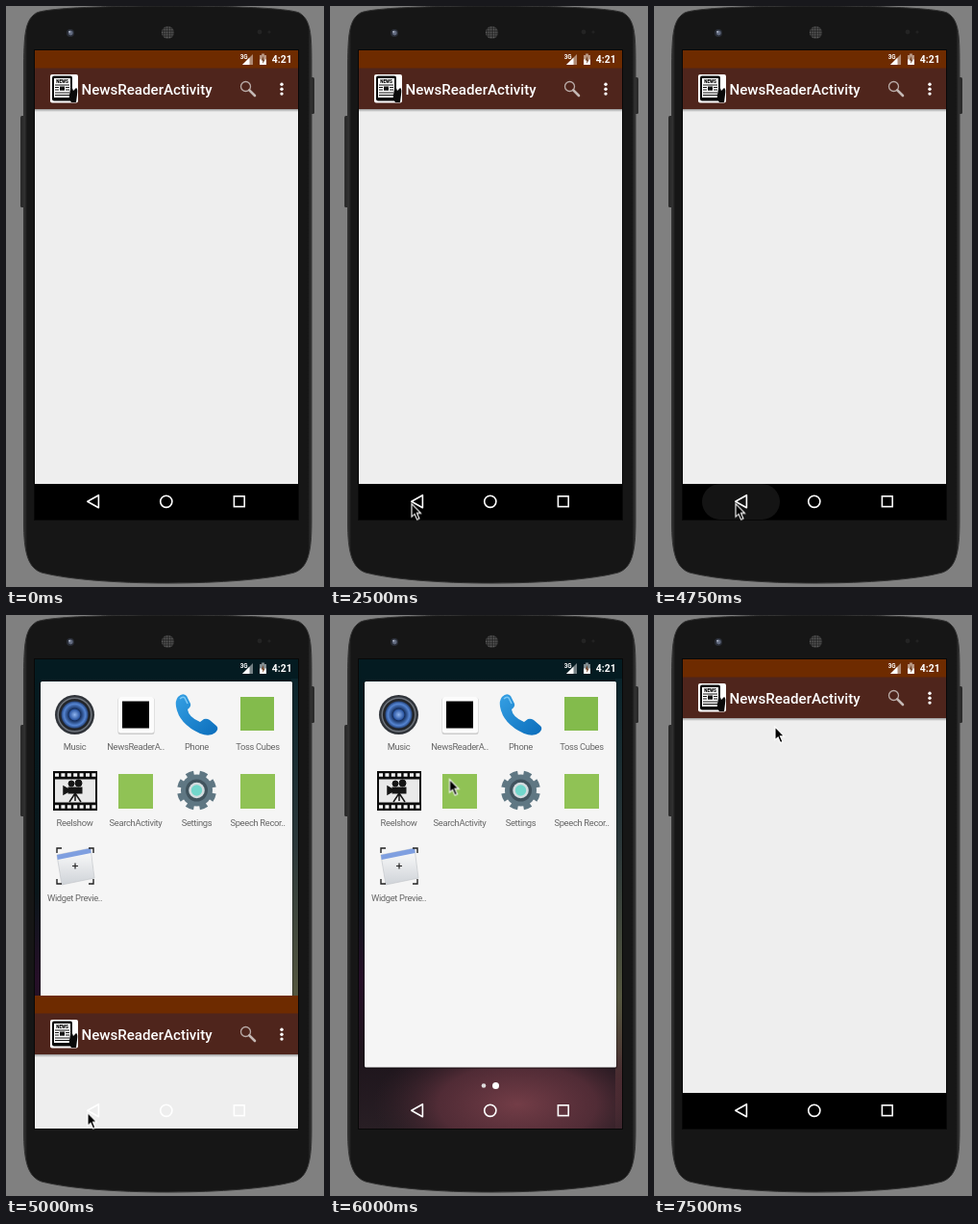
An HTML page that plays this animation: 331x603 px, repeating every 8000 ms.

```html
<!DOCTYPE html>
<html lang="en">
<head>
<meta charset="utf-8">
<title>Phone app launcher</title>
<style>
  html, body { margin: 0; width: 100%; height: 100%; overflow: hidden; background: #808080; }
  svg { display: block; width: 331px; height: 603px; }
  text { font-family: Roboto, "Open Sans", sans-serif; }
  .label { font-size: 9.4px; letter-spacing: -.33px; fill: #666; text-anchor: middle; }
  .line { fill: none; stroke: #fff; stroke-width: 1.6; }
</style>
</head>
<body>
<svg viewBox="0 0 331 603">
  <defs>
    <clipPath id="screen"><rect x="30" y="46" width="274" height="487"/></clipPath>
    <linearGradient id="rim">
      <stop offset="0" stop-color="#3a3a3a"/><stop offset=".012" stop-color="#161616"/>
      <stop offset=".988" stop-color="#161616"/><stop offset="1" stop-color="#3a3a3a"/>
    </linearGradient>
    <linearGradient id="wall" x2="0" y2="1">
      <stop offset="0" stop-color="#041b21"/><stop offset=".5" stop-color="#0a161a"/>
      <stop offset=".68" stop-color="#260f28"/><stop offset=".85" stop-color="#1e151c"/>
      <stop offset="1" stop-color="#281e24"/>
    </linearGradient>
    <linearGradient id="side" x2="0" y2="1">
      <stop offset="0" stop-color="#06222a"/><stop offset=".4" stop-color="#2c383a"/>
      <stop offset=".72" stop-color="#55573f"/><stop offset=".9" stop-color="#4a2c30"/>
      <stop offset="1" stop-color="#33242a"/>
    </linearGradient>
    <radialGradient id="glow">
      <stop offset="0" stop-color="#733d47"/><stop offset=".55" stop-color="#5c303b" stop-opacity=".8"/>
      <stop offset="1" stop-color="#3a222b" stop-opacity="0"/>
    </radialGradient>
    <linearGradient id="drop" x2="0" y2="1">
      <stop offset="0" stop-color="#999"/><stop offset="1" stop-color="#eee"/>
    </linearGradient>
    <radialGradient id="cone">
      <stop offset="0" stop-color="#8fb4ee"/><stop offset=".38" stop-color="#2f5aa6"/>
      <stop offset=".45" stop-color="#16305f"/><stop offset=".8" stop-color="#5585d2"/>
      <stop offset="1" stop-color="#25447c"/>
    </radialGradient>
    <linearGradient id="blue" x2="1" y2="1">
      <stop offset="0" stop-color="#35a0e4"/><stop offset="1" stop-color="#0b6dbb"/>
    </linearGradient>
    <linearGradient id="pane" x2="0" y2="1">
      <stop offset="0" stop-color="#fdfdfd"/><stop offset="1" stop-color="#cfd3d8"/>
    </linearGradient>
    <pattern id="mesh" width="2.6" height="2.6" patternUnits="userSpaceOnUse">
      <circle cx="1.3" cy="1.3" r=".8" fill="#6a6a6a"/>
    </pattern>
  </defs>

  <!-- phone -->
  <rect width="331" height="603" fill="#808080"/>
  <rect x="15" y="114" width="5" height="95" rx="1.5" fill="#2b2b2b"/>
  <rect x="316" y="74" width="5" height="38" rx="1.5" fill="#2b2b2b"/>
  <path d="M18.5 60C19 28 20 14 32 7 44 2 100 0 168 0S292 2 305 7C317 14 318 28 318 60V535C318 568 314 583 300 588 274 595 222 599 168 599S64 595 37 588C23 583 18.5 568 18.5 535Z" fill="url(#rim)" stroke="#303030"/>
  <circle cx="67" cy="28" r="4" fill="#292d36"/>
  <circle cx="67.3" cy="28" r="2.4" fill="#626b80"/>
  <circle cx="66.2" cy="26.8" r="1" fill="#b0b7c6"/>
  <circle cx="168.5" cy="27.5" r="6.7" fill="#262626"/>
  <circle cx="168.5" cy="27.5" r="6.5" fill="url(#mesh)"/>
  <circle cx="264" cy="27" r="2.4" fill="#242424"/>
  <circle cx="274" cy="27" r="1.6" fill="#222"/>
  <rect x="29" y="45" width="276" height="489" fill="#080808"/>

  <g clip-path="url(#screen)">
    <!-- launcher -->
    <rect x="30" y="46" width="274" height="487" fill="url(#wall)"/>
    <rect x="297" y="46" width="7" height="487" fill="url(#side)"/>
    <rect x="30" y="46" width="274" height="20" fill="#041b21"/>
    <ellipse cx="195" cy="508" rx="150" ry="75" fill="url(#glow)"/>
    <rect x="35" y="69" width="264" height="402" rx="2" fill="#000" opacity=".35"/>
    <rect x="36" y="69" width="262" height="400.5" rx="1.5" fill="#f5f5f5"/>
    <circle cx="160" cy="488.5" r="2.3" fill="#ddd"/>
    <circle cx="172.5" cy="488.5" r="3.5" fill="#fff"/>

    <!-- speaker -->
    <circle cx="71.5" cy="103.5" r="20.5" fill="#30343a"/>
    <circle cx="71.5" cy="103.5" r="17.3" fill="#22252a" stroke="#6e747c" stroke-width="1.5"/>
    <circle cx="71.5" cy="103.5" r="14" fill="url(#cone)"/>

    <!-- reader tile -->
    <rect x="116.5" y="85.5" width="38" height="38.5" rx="2.5" fill="#ccc"/>
    <rect x="117" y="85" width="37" height="37.5" rx="2.5" fill="#fcfcfc"/>
    <rect id="tile" x="121" y="89.5" width="28" height="28" fill="#000"/>

    <!-- handset -->
    <path d="M179 85Q184 80 188 84L192 92Q193 95 189 98 190 106 202 111L206 108Q209 107 212 109L219 115Q222 118 218 122 212 127 202 123 180 113 177 95 176 89 179 85Z" fill="url(#blue)"/>
    <path d="M181 87Q184 84 186 86L189 92" fill="none" stroke="#7cc8f4" stroke-width="1.5"/>

    <rect x="244" y="85" width="35" height="35" fill="#83bb4c"/>
    <rect x="117" y="165" width="36" height="36" fill="#90c255"/>
    <rect x="244" y="165" width="36" height="36" fill="#90c255"/>

    <!-- film -->
    <rect x="49" y="162" width="46" height="41" fill="#0b0b0b"/>
    <path d="M51 166H94M51 199H94" stroke="#f5f5f5" stroke-width="3.6" stroke-dasharray="4 2.4"/>
    <rect x="51" y="170.5" width="42" height="24" fill="#e9e9e9"/>
    <g fill="#151515" stroke="#151515">
      <circle cx="68" cy="175" r="3"/><circle cx="75.5" cy="174.5" r="3.5"/>
      <rect x="65" y="179" width="14" height="6"/>
      <path d="M65 181L60 178V186L65 183M72 185L66 194M72 185L78 194M72 185V193" stroke-width="1.5"/>
    </g>

    <!-- gear -->
    <circle cx="198.5" cy="182" r="16.5" fill="#5f7783"/>
    <circle cx="198.5" cy="182" r="17.5" fill="none" stroke="#5f7783" stroke-width="6" pathLength="80" stroke-dasharray="5.6 4.4" stroke-dashoffset="-2.2"/>
    <circle cx="198.5" cy="182" r="11.5" fill="#41545e"/>
    <circle cx="198.5" cy="182" r="8.3" fill="#d3dcdf"/>
    <circle cx="198.5" cy="182" r="5.7" fill="#72d7cc"/>

    <!-- widget -->
    <path d="M53 249L88 242 92 273 58 280Z" fill="url(#pane)" stroke="#c4c8cc" stroke-width=".7"/>
    <path d="M53 249L88 242 88.6 247 53.7 254Z" fill="#7f9fe0"/>
    <path d="M53 247V242H58M86 242H91V247M91 274V279H86M58 279H53V274" fill="none" stroke="#222" stroke-width="1.4"/>
    <path d="M69 260.5H75M72 257.5V263.5" stroke="#222" stroke-width="1.2"/>

    <g id="labels"></g>

    <!-- reader screen -->
    <g id="app">
      <rect x="30" y="46" width="274" height="19" fill="#6e2b00"/>
      <rect x="30" y="64.5" width="274" height="43" fill="#4f251c"/>
      <rect x="30" y="107" width="274" height="430" fill="#eee"/>
      <rect x="30" y="107" width="274" height="3" fill="url(#drop)"/>
      <rect x="46" y="71" width="29" height="29.5" rx="2" fill="#fff"/>
      <rect x="48" y="72.5" width="21" height="26" rx="2" fill="#0a0a0a"/>
      <rect x="50" y="75" width="17" height="20" fill="#fff"/>
      <text x="58.5" y="79.8" font-size="4.6" font-weight="900" text-anchor="middle">NEWS</text>
      <path d="M51 82H66M51 84.5H55M62 84.5H66M51 87H55M62 87H66M51 90H66M51 92.5H66" stroke="#111" stroke-width="1.1"/>
      <rect x="56" y="83.5" width="5" height="4.2" fill="#111"/>
      <path d="M67 86Q69 83 70 88L73 85Q75 86 74 92L73 100H68Q65 96 66 92Z" fill="#0a0a0a"/>
      <text x="78.5" y="92" font-size="15.1" font-weight="500" fill="#fff">NewsReaderActivity</text>
      <circle cx="249.5" cy="83.5" r="5" fill="none" stroke="#b9aba7" stroke-width="1.3"/>
      <path d="M253.3 87.3L259 93" stroke="#c4b8b4" stroke-width="2.6" stroke-linecap="round"/>
      <g fill="#fff"><circle cx="287" cy="81.3" r="1.7"/><circle cx="287" cy="86.2" r="1.7"/><circle cx="287" cy="91.1" r="1.7"/></g>
    </g>

    <!-- status -->
    <g fill="#fff">
      <text x="243.7" y="54.5" font-size="6.3" font-weight="700">3G</text>
      <path d="M246 61L257 50V61Z" opacity=".45"/>
      <path d="M246 61L253.5 53.5V61Z"/>
      <path d="M264 51H266V49.5H269V51H271V61H264Z" opacity=".5"/>
      <path d="M264 55.5H271V61H264Z"/>
      <path d="M268 52L265.8 56.5H267.3V60L269.5 55.5H268Z" fill="#6b3a1c"/>
      <text x="276.8" y="59.2" font-size="10.4" font-weight="700">4:21</text>
    </g>

    <!-- navigation -->
    <rect id="bar" x="30" y="496" width="274" height="37" fill="#000"/>
    <rect id="ripple" x="50" y="496" width="81" height="37" rx="18.5" fill="#323232"/>
    <path class="line" d="M84.8 514.2L96.4 507.7V520.7Z" stroke-linejoin="round"/>
    <circle class="line" cx="166.8" cy="514.3" r="6.1"/>
    <rect class="line" x="237.4" y="508.8" width="10.8" height="10.8"/>
  </g>

  <path id="cursor" d="M0 0V13.6L3.1 10.8 5.6 16.6 8 15.5 5.5 9.9H9.6Z" fill="#000" stroke="#fff" stroke-width="1.1"/>
</svg>
<script>
  const LOOP = 8000;
  const $ = id => document.getElementById(id);

  const names = ['Music', 'NewsReaderA..', 'Phone', 'Toss Cubes', 'Reelshow',
    'SearchActivity', 'Settings', 'Speech Recor..', 'Widget Previe..'];
  const columns = [71.5, 135, 198.5, 262];
  $('labels').innerHTML = names.map((name, i) =>
    `<text class="label" x="${columns[i % 4]}" y="${140 + 78.6 * Math.floor(i / 4)}">${name}</text>`
  ).join('');

  // Each step is [time in ms, properties]; values hold until the next step.
  function play(id, steps) {
    const frames = steps.map(([t, props]) => ({ offset: t / LOOP, easing: 'step-end', ...props }));
    frames.push({ ...frames[frames.length - 1], offset: 1 });
    $(id).animate(frames, { duration: LOOP, iterations: Infinity });
  }
  const at = (x, y, opacity = 1) => ({ transform: `translate(${x}px, ${y}px)`, opacity });
  const fade = opacity => ({ opacity });

  const path = [
    [500, 108, 160], [750, 217, 112], [1000, 243, 95], [1250, 248, 93], [1750, 247, 94],
    [2000, 43, 590], [2250, 87, 518], [2500, 85, 516.5], [5500, 95, 178],
    [5750, 188, 188], [6000, 124.5, 170.5], [6250, 125.5, 110], [6500, 126, 116]
  ];
  play('cursor', [[0, at(108, 160, 0)], ...path.map(([t, x, y]) => [t, at(x, y)])]);
  play('app', [[0, at(0, 0)], [5000, at(0, 349)], [5250, at(0, 349, 0)], [7500, at(0, 0)]]);
  play('bar', [[0, fade(1)], [5000, fade(0)], [7500, fade(1)]]);
  play('ripple', [[0, fade(0)], [4500, fade(1)], [4750, fade(.4)], [5000, fade(0)]]);
  play('tile', [[0, { fill: '#000' }], [7000, { fill: '#363636' }], [7250, { fill: '#646464' }], [7500, { fill: '#000' }]]);
</script>
</body>
</html>
```
